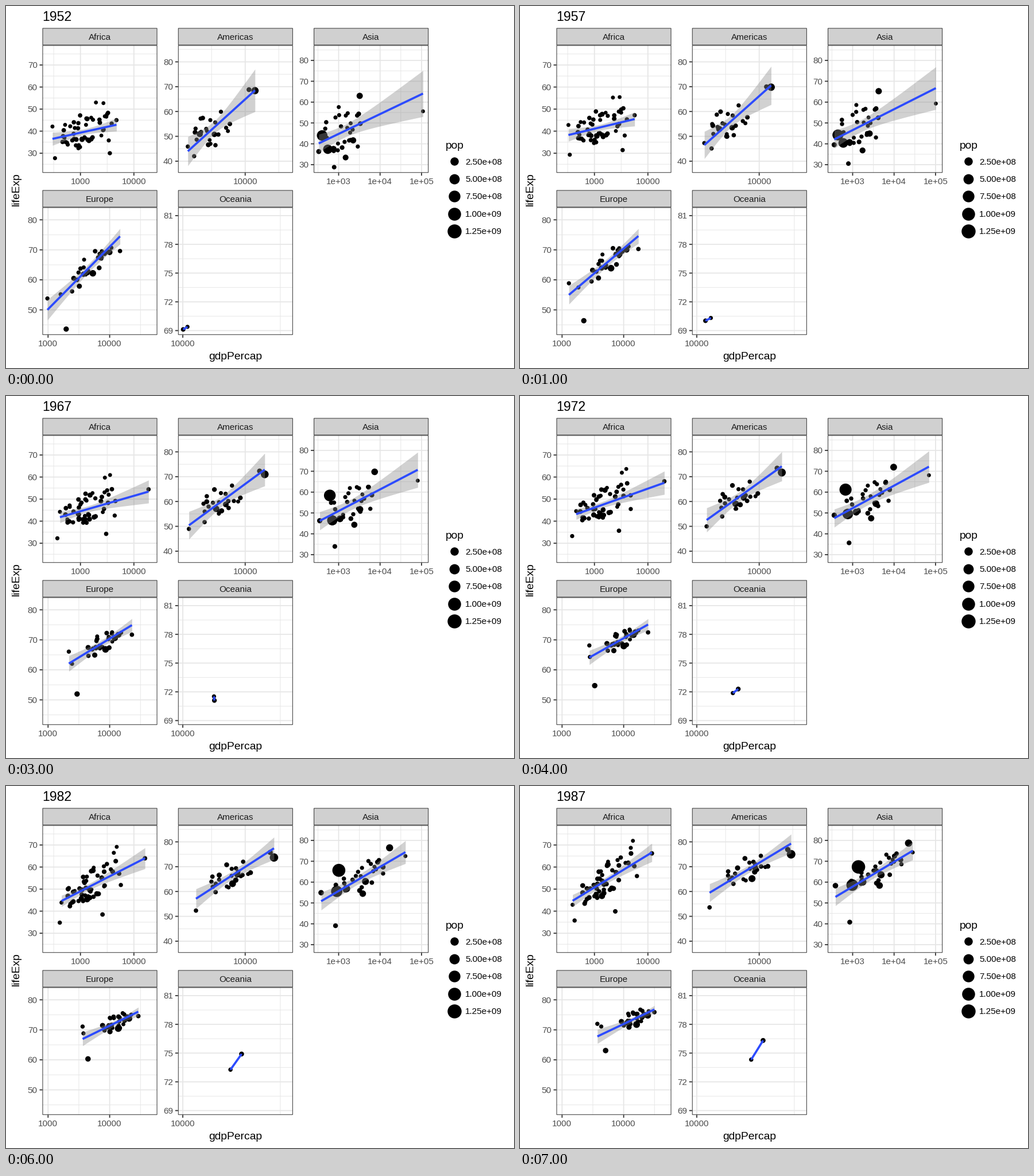
A matplotlib script that plays this animation: 885 by 632 pixels, repeating every 8 s.

```python
import numpy as np
import matplotlib.pyplot as plt
from matplotlib.animation import FuncAnimation
from matplotlib.patches import Rectangle

W, H, DPI = 885, 632, 72          # at 72 dpi one point is one pixel
YEARS = range(1952, 1992, 5)
KEYS = (1952, 1962, 1967, 1977, 1987)
PANEL_W, PANEL_H, STRIP_H = 200, 222.7, 30
DARK, GRID, STRIP, BLUE = "#333333", "#e6e6e6", "#d0d0d0", "#2c4bff"

plt.rcParams["font.family"] = "Liberation Sans"
plt.rcParams["path.snap"] = False


def at(year, values):
    """Value at a year, from a start and an end or from one value per key year."""
    years = (KEYS[0], KEYS[-1]) if len(values) == 2 else KEYS
    return np.interp(year, years, values)


def diameter(pop):
    """Dot diameter in pixels for a population in millions."""
    return 6.5 + 18.4 * np.sqrt(np.asarray(pop) / 1318.7)


def label(x, y, text, size=15.2, color="#4d4d4d", ha="center"):
    """Text with its digits centred on y."""
    return ax.text(x, y + 0.355 * size, text, size=size, color=color,
                   ha=ha, va="baseline", zorder=8)


def rule(xs, ys, color, width, z):
    ax.plot(xs, ys, color=color, lw=width, zorder=z, solid_capstyle="butt")


def frame(x, y, w, h, fill):
    """Box whose border lies inside its edges."""
    ax.add_patch(Rectangle((x + 0.45, y + 0.45), w - 0.9, h - 0.9,
                           fc=fill, ec=DARK, lw=1, zorder=7))


class Cloud:
    """Dots scattered about the trend, drifting slowly along and across it."""

    def __init__(self, n, seed, centre, reach, scatter):
        rng = np.random.default_rng(seed)
        first, other = 2 * rng.beta(2, 2, (2, 2, n)) - 1
        first -= first.mean(axis=1, keepdims=True)
        self.first, self.last = first, 0.8 * first + 0.35 * other
        self.pop = rng.lognormal(1.5, 1, n)
        self.centre, self.reach, self.scatter = centre, reach, scatter

    def place(self, year, trend):
        t = at(year, (0, 1))
        along, across = self.first + t * (self.last - self.first)
        x = at(year, self.centre) + at(year, self.reach) * along
        return x, trend(x) + at(year, self.scatter) * across, self.pop


class Panel:
    """One facet: trend = x0, x1, y0, y1 of the line over the years;
    ends = offset of the outermost dots from the line, left and right;
    tracks = (log income, life, population) of single dots;
    band = waist, centre and flare of the confidence band."""

    def __init__(self, name, left, top, xmap, ymap, xticks, yticks, trend,
                 ends=((0, 0), (0, 0)), end_pops=(3, 10),
                 cloud=None, tracks=(), band=None, growth=1.02):
        self.xmap, self.ymap, self.trend = xmap, ymap, trend
        self.ends, self.end_pops = ends, end_pops
        self.cloud, self.tracks, self.band = cloud, tracks, band
        self.growth = growth
        self.draw_frame(name, left, top, xticks, yticks)
        self.dots = ax.scatter([], [], color="black", linewidths=0, zorder=4)
        self.line, = ax.plot([], [], color=BLUE, lw=3.7, zorder=6,
                             solid_capstyle="butt")
        self.area = None

    def px(self, logx):
        ref, pos, scale = self.xmap
        return pos + (logx - ref) * scale

    def py(self, v):
        ref, pos, scale = self.ymap
        return pos + (ref - v) * scale

    def draw_frame(self, name, left, top, xticks, yticks):
        right, bottom = left + PANEL_W, top + PANEL_H
        for v in np.arange(2.5, 5.1, 0.5):
            x, major = self.px(v), v % 1 == 0
            if left < x < right:
                rule([x, x], [top, bottom], GRID, 1.8 if major else 0.95, 1 + major)
        for k in range(-1, 2 * len(yticks)):
            y, major = self.py(yticks[0] + k * yticks.step / 2), k % 2 == 0
            if top < y < bottom:
                rule([left, right], [y, y], GRID, 1.8 if major else 0.95, 1 + major)
        for v, text in xticks:
            x = self.px(v)
            rule([x, x], [bottom, bottom + 5], DARK, 1.8, 7)
            label(x, bottom + 14.5, text)
        for v in yticks:
            y = self.py(v)
            rule([left - 5, left], [y, y], DARK, 1.8, 7)
            label(left - 8.8, y, str(v), ha="right")
        frame(left, top - STRIP_H, PANEL_W, STRIP_H, STRIP)
        frame(left, top, PANEL_W, PANEL_H, "none")
        label(left + PANEL_W / 2, top - STRIP_H / 2 + 0.5, name, color="#1a1a1a")

    def show(self, year):
        x0, x1, y0, y1 = (at(year, v) for v in self.trend)

        def trend(x):
            return y0 + (y1 - y0) * (x - x0) / (x1 - x0)

        low, high = (at(year, e) for e in self.ends)
        groups = [([x0, x1], [y0 + low, y1 + high], self.end_pops)]
        groups += [([at(year, x)], [at(year, y)], [pop]) for x, y, pop in self.tracks]
        if self.cloud:
            groups.append(self.cloud.place(year, trend))
        x, y, pop = (np.concatenate(part) for part in zip(*groups))
        self.dots.set_offsets(np.c_[self.px(x), self.py(y)])
        self.dots.set_sizes(diameter(pop * self.growth ** (year - 1967)) ** 2)
        self.line.set_data(self.px(np.array([x0, x1])), self.py(np.array([y0, y1])))

        if self.band:
            if self.area:
                self.area.remove()
            waist, centre, flare = (at(year, v) for v in self.band)
            gx = np.linspace(x0, x1, 80)
            half = np.hypot(waist, flare * (gx - centre))
            self.area = ax.fill_between(
                self.px(gx), self.py(trend(gx) - half), self.py(trend(gx) + half),
                color="#8c8c8c", alpha=0.4, lw=0, zorder=5)


fig = plt.figure(figsize=(W / DPI, H / DPI), dpi=DPI, facecolor="white")
ax = fig.add_axes([0, 0, 1, 1])
ax.set_xlim(0, W)
ax.set_ylim(H, 0)
ax.set_autoscale_on(False)
ax.axis("off")

THOUSANDS = [(3, "1000"), (4, "10000")]
TEN = [(4, "10000")]
POWERS = [(3, "1e+03"), (4, "1e+04"), (5, "1e+05")]
COLS, ROWS = (63.5, 299.8, 536.1), (68.5, 351.5)

panels = [
    Panel("Africa", COLS[0], ROWS[0], (3, 129.7, 93.1), (70, 103, 3.85),
          THOUSANDS, range(30, 80, 10),
          trend=((2.476, 2.55, 2.616, 2.70, 2.591),
                 (3.674, 3.83, 4.274, 4.341, 4.074),
                 (36.5, 40, 41.8, 44.55, 44.7),
                 (42.9, 48.05, 53.4, 61.4, 66.6)),
          ends=((5.6, -1.8), (2.1, -0.4)), end_pops=(1, 5),
          cloud=Cloud(46, 4, (3.06, 3.19), (0.6, 0.66), (10, 11)),
          tracks=[((3.29, 3.68), (53, 68.7), 0.8),
                  ((3.43, 3.72), (52.7, 71.9), 0.4),
                  ((3.55, 3.39), (30, 39.9), 5),
                  ((3.03, 3.14), (36.3, 46.9), 47)],
          band=((1.3, 1.5), (3.08, 3.15), (4.4, 4.2)), growth=1.026),
    Panel("Americas", COLS[1], ROWS[0], (4, 416.7, 117), (80, 97.5, 4.335),
          TEN, range(40, 90, 10),
          trend=((3.146, 3.221, 3.162, 3.273, 3.261),
                 (4.146, 4.209, 4.291, 4.382, 4.475),
                 (44, 49, 50.4, 54.7, 59.5),
                 (68.5, 72.5, 72.85, 75.5, 79.3)),
          ends=((1.9, -5.9), (-0.1, -4.3)), end_pops=(4, 199),
          cloud=Cloud(20, 9, (3.47, 3.8), (0.36, 0.46), (12, 7)),
          tracks=[((4.056, 4.425), (68.8, 76.9), 20.8),
                  ((3.324, 3.893), (50.9, 65.2), 88),
                  ((3.541, 3.939), (50.8, 69.5), 48)],
          band=((2.5, 1.5), (3.54, 3.85), (13.5, 5.6)), growth=1.018),
    Panel("Asia", COLS[2], ROWS[0], (3, 579.5, 72.2), (80, 95, 3.64),
          POWERS, range(30, 90, 10),
          trend=((2.52, 2.589, 2.543, 2.569, 2.585),
                 (5.035, 4.98, 4.908, 4.773, 4.449),
                 (40.2, 44, 46.2, 48.8, 52.9),
                 (64.1, 69.3, 70.7, 73.7, 75.05)),
          ends=((-3.9, 5.4), (-8.5, -0.8)), end_pops=(26, 0.6),
          cloud=Cloud(26, 2, (3.14, 3.66), (0.52, 0.76), (15, 8)),
          tracks=[((2.602, 2.688, 2.787, 2.87, 3.14),
                   (44, 44.5, 58.4, 64, 67.3), 755),
                  ((2.738, 2.99), (37.4, 58.6), 506),
                  ((2.875, 3.243), (37.5, 60.1), 109),
                  ((3.508, 4.35), (63, 78.7), 101),
                  ((2.892, 2.93), (28.8, 40.8), 11)],
          band=((3, 2), (3.1, 3.49), (5.5, 4.1))),
    Panel("Europe", COLS[0], ROWS[1], (3, 73.3, 107.3), (80, 373.3, 5.24),
          THOUSANDS, range(50, 90, 10),
          trend=((2.989, 3.233, 3.337, 3.548, 3.573),
                 (4.168, 4.31, 4.361, 4.431, 4.499),
                 (50, 60, 62.1, 66.1, 67.8),
                 (74.5, 74.7, 74.9, 75.3, 76.8)),
          ends=((3.8, 4.2), (-4.9, -0.9)), end_pops=(3, 6),
          cloud=Cloud(24, 6, (3.68, 4.19), (0.36, 0.3), (4.5, 4)),
          tracks=[((3.294, 3.707), (43.6, 63.1), 33),
                  ((3.204, 3.636), (55.2, 71.1), 2),
                  ((3.854, 4.392), (67.5, 74.8), 76),
                  ((3.999, 4.336), (69.2, 75), 55)],
          band=((1.4, 0.8), (3.68, 4.21), (4.5, 3.5)), growth=1.006),
    Panel("Oceania", COLS[1], ROWS[1], (4, 308, 339.7), (81, 366, 16.72),
          TEN, range(69, 82, 3),
          trend=((4.002, 4.087, 4.162, 4.263, 4.34),
                 (4.024, 4.12, 4.16, 4.21, 4.279),
                 (69.12, 70.93, 71.1, 73.49, 76.32),
                 (69.39, 71.24, 71.52, 72.22, 74.32)),
          end_pops=(11.9, 2.7)),
]

title = label(63, 18, "", 23, "black", "left")
label(399.5, 610.5, "gdpPercap", 19.2, "black")
ax.text(18, 320.5, "lifeExp", size=19.2, rotation=90, ha="center", va="center")
label(766, 242, "pop", 19.2, "black", "left")
for i, text in enumerate(["2.50e+08", "5.00e+08", "7.50e+08", "1.00e+09", "1.25e+09"]):
    y = 271.3 + 30.4 * i
    ax.scatter([781.3], [y], s=diameter(250 * (i + 1)) ** 2, color="black", linewidths=0)
    label(800, y, text, color="black", ha="left")


def update(i):
    year = YEARS[i]
    title.set_text(str(year))
    for panel in panels:
        panel.show(year)
    return []


anim = FuncAnimation(fig, update, frames=len(YEARS), interval=1000,
                     repeat=True, repeat_delay=0, blit=False)
plt.show()
```
